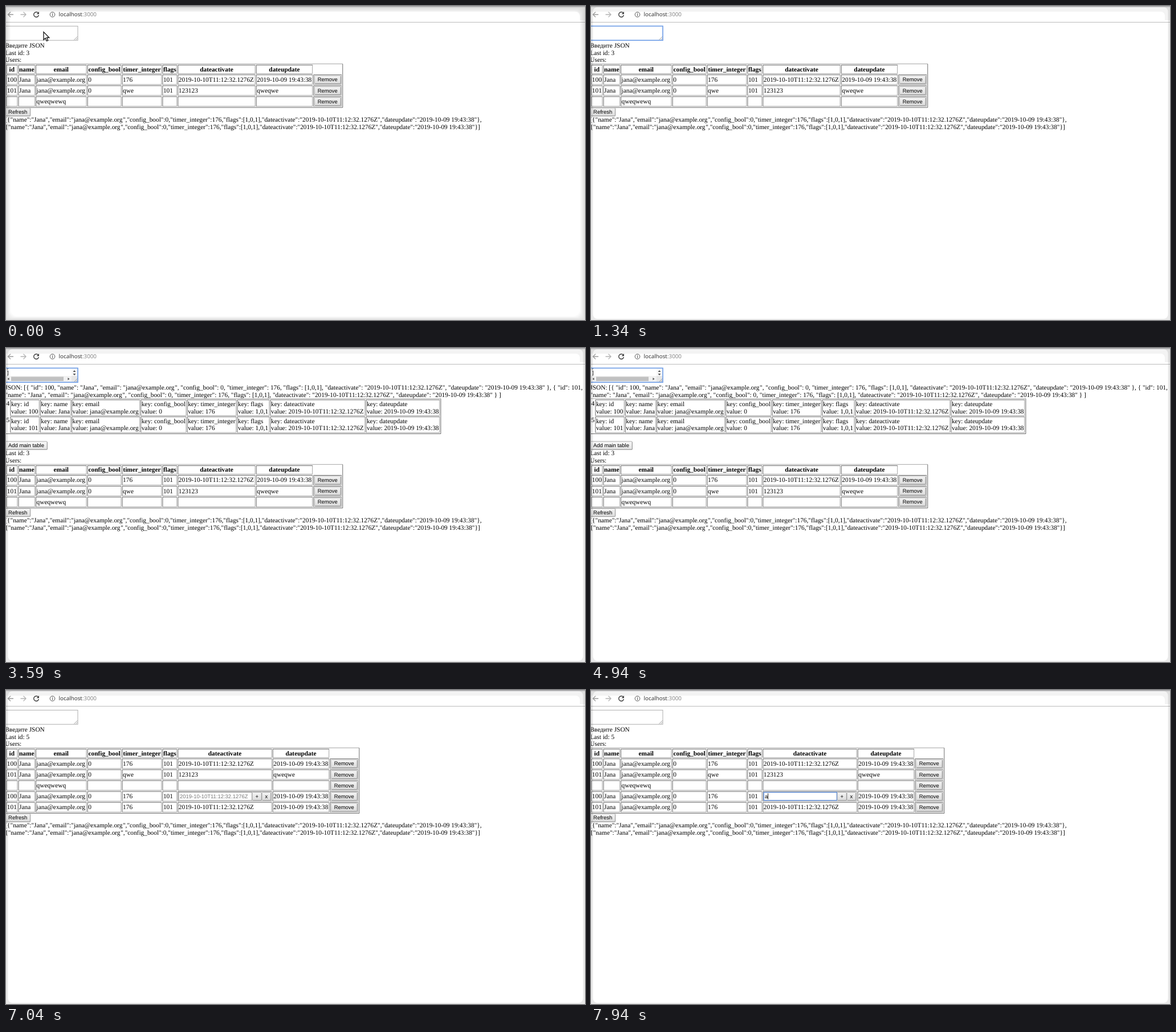
An HTML page that plays this animation: 1016 by 551 pixels, repeating every 8000 ms.

```html
<!DOCTYPE html>
<html lang="en">
<head>
<meta charset="utf-8">
<title>JSON user table</title>
<style>
html, body { margin: 0; width: 100%; height: 100%; overflow: hidden; background: #fff; }
svg { display: block; width: 100vw; height: 100vh; }
text { font-family: "Liberation Serif", serif; font-size: 16px; text-rendering: geometricPrecision; }
.b { font-weight: bold; text-anchor: middle; }
.ui { font-family: "Liberation Sans", sans-serif; font-size: 13.333px; }
.mid { text-anchor: middle; }
.url { font-family: "Noto Sans", sans-serif; font-size: 9.8px; }
.mono { font-family: "DejaVu Sans Mono", monospace; font-size: 9.44px; }
</style>
</head>
<body>
<svg id="stage" viewBox="0 0 1016 551" preserveAspectRatio="none">
  <defs>
    <linearGradient id="face" x2="0" y2="1"><stop stop-color="#f4f4f4"/><stop offset="1" stop-color="#dcdcdc"/></linearGradient>
    <linearGradient id="hover" x2="0" y2="1"><stop stop-color="#f9f9f9"/><stop offset="1" stop-color="#e4e4e4"/></linearGradient>
    <clipPath id="area"><rect y="36" width="115" height="13"/></clipPath>
  </defs>
  <g id="bar" fill="none" stroke-width="1.3">
    <path d="M0 2H1016V25H1007V17a7 7 0 0 0-7-7H0z" fill="#f3f3f3"/>
    <path d="M0 1H1016" stroke="#c2c2c4" stroke-width="2"/>
    <path d="M0 28.5H1016" stroke="#bcbcbc" stroke-width="1"/>
    <path d="M13 15H3.5M8 10.5L3.5 15L8 19.5" stroke="#9b9b9b"/>
    <path d="M25.500 15H35M30.500 10.500L35 15L30.500 19.500" stroke="#b4b4b4"/>
    <path d="M56.4 12.100A4.400 4.400 0 1 0 57.400 16" stroke="#444" stroke-width="1.500"/>
    <path d="M58 9.800V14.200H53.600z" fill="#444"/>
    <circle cx="81.500" cy="15" r="4.300" stroke="#555" stroke-width="1"/>
    <path d="M81.500 14.300V17.500M81.500 12.300V13.400" stroke="#555" stroke-width="1.100"/>
    <text class="url" x="92.500" y="18.300" fill="#333">localhost<tspan fill="#868686">:3000</tspan></text>
  </g>
  <g id="box"></g>
  <g id="page" transform="translate(-1.7 63) scale(.7083)"></g>
  <g id="glow"></g>
  <path id="mouse" d="M66 45.500V59.300L69.200 56.400L71.400 61.500L73.700 60.500L71.500 55.500H75.800z" fill="#fff" stroke="#111" stroke-width="1.300"/>
</svg>
<script>
const LOOP = 8000;
const NAME = "Jana", MAIL = "jana@example.org";
const STAMP = "2019-10-10T11:12:32.1276Z", UPDATED = "2019-10-09 19:43:38";
const KEYS = ["id", "name", "email", "config_bool", "timer_integer", "flags", "dateactivate", "dateupdate"];
const user = id => [id, NAME, MAIL, "0", "176", "101", STAMP, UPDATED];
const ROWS = [
  user("100"),
  ["101", NAME, MAIL, "0", "qwe", "101", "123123", "qweqwe"],
  ["", "", "qweqwewq", "", "", "", "", ""],
  user("100"),
  user("101")
];
const FIELDS = `"name":"${NAME}","email":"${MAIL}","config_bool":0,"timer_integer":176,"flags":[1,0,1],"dateactivate":"${STAMP}","dateupdate":"${UPDATED}"`;
const SPACED = FIELDS.replace(/":/g, '": ').replace(/,"/g, ', "');
const DARK = "#2c2c2c", GRAY = "#808080";
const $ = id => document.getElementById(id);

function text(x, y, s, cls = "", fill = "#000") {
  const body = String(s).replace(MAIL + '"', MAIL + '<tspan dx=".9">"</tspan>');
  return `<text x="${x}" y="${y}" class="${cls}" fill="${fill}">${body}</text>`;
}

const rect = (x, y, w, h, fill, extra = "") =>
  `<rect x="${x}" y="${y}" width="${w}" height="${h}" fill="${fill}" ${extra}/>`;

const path = (d, stroke, width = 1, fill = "none") =>
  `<path d="${d}" fill="${fill}" stroke="${stroke}" stroke-width="${width}"/>`;

function bevel(x, y, w, h, tl, br) {
  const l = x + .5, t = y + .5, r = x + w - .5, b = y + h - .5;
  return path(`M${l} ${y + h}V${t}H${x + w}`, tl) + path(`M${r} ${y + 1}V${b}H${x + 1}`, br);
}
const cell = (x, y, w, h) => bevel(x, y, w, h, DARK, GRAY);
const frame = (x, y, w, h) => bevel(x, y, w, h, GRAY, DARK);

function button(x, y, w, label, hot) {
  return rect(x + .5, y + .5, w - 1, 20, `url(#${hot ? "hover" : "face"})`, `rx="2" stroke="${hot ? "#8c8c8c" : "#a0a0a0"}"`) +
    path(`M${x + 2} ${y + 20.5}H${x + w - .5}V${y + 2}`, "#8a8a8a") +
    text(x + w / 2, y + 15, label, "ui mid");
}

function columns(widths, x) {
  return widths.map(w => { const c = { x, w }; x += w + 2; return c; });
}

function editor(x, y, s) {
  let out = rect(x + .5, y + .5, 181, 20, "#fff", `stroke="${s.active ? "#5f8fdc" : "#a0a0a0"}" stroke-width="${s.active ? 2 : 1.3}"`);
  out += s.typed ? text(x + 3, y + 15, "a", "ui") : text(x + 3, y + 15, STAMP, "ui", "#757575");
  if (s.active) out += rect(x + (s.typed ? 10.4 : 3), y + 3, 1.2, 15, "#000");
  return out + button(x + 182, y, 24, "+") + button(x + 206, y, 23, "x");
}

function mainTable(top, s) {
  const cols = columns([28, 41, 126, 84, 98, 36, s.edit ? 233 : 192, 140, 70], 3);
  const count = s.done ? 5 : 3, last = cols[8];
  const height = 28 + count * 27;
  let out = frame(0, top, last.x + last.w + 3, height);
  KEYS.forEach((key, i) => {
    const { x, w } = cols[i];
    out += cell(x, top + 3, w, 22) + text(x + w / 2, top + 19, key, "b");
  });
  ROWS.slice(0, count).forEach((row, r) => {
    const y = top + 27 + r * 27;
    row.forEach((value, i) => {
      const { x, w } = cols[i];
      out += cell(x, y, w, 25);
      out += s.edit && r === 3 && i === 6 ? editor(x + 2, y + 2, s) : text(x + 2, y + 17.5, value);
    });
    out += cell(last.x, y, last.w, 25) + button(last.x + 2, y + 2, 66, "Remove");
  });
  const end = top + height;
  return out + button(0, end, 63, "Refresh") +
    text(0, end + 35, `[{${FIELDS}},`) + text(0, end + 53, `{${FIELDS}}]`);
}

function preview(s) {
  const cols = columns([72, 76, 169, 113, 122, 80, 235, 183], 13);
  let out = text(0, 14, `JSON: [{ "id": 100, ${SPACED} }, { "id": 101,`) + text(0, 32, `${SPACED} } ]`);
  out += frame(0, 36, 1080, 88);
  [100, 101].forEach((id, r) => {
    const y = 39 + r * 42;
    const values = [id, NAME, MAIL, "0", "176", "1,0,1", STAMP, UPDATED];
    out += text(3, y + 14, 4 + r);
    cols.forEach(({ x, w }, i) => {
      out += cell(x, y, w, 40) + text(x + 2, y + 16, "key: " + KEYS[i]) + text(x + 2, y + 34, "value: " + values[i]);
    });
  });
  return out + button(0, 142, 105, "Add main table", s.hot);
}

function pageBody(s) {
  const top = s.loaded ? 163 : 18;
  return (s.loaded ? preview(s) : text(0, 14, "Введите JSON")) +
    text(0, top + 14, "Last id: " + (s.done ? 5 : 3)) +
    text(0, top + 32, "Users:") + mainTable(top + 36, s);
}

function textBox(s) {
  let out = rect(-1.3, 35.3, 127.3, 24.9, "#fff");
  if (s.loaded) {
    out += `<g clip-path="url(#area)">${text(.4, 35.9, "}", "mono")}${text(.4, 46.5, "]", "mono")}</g>`;
    out += rect(0, 49, 115, 10.5, "#f1f1f1") + rect(9, 50.5, 92, 7.5, "#c1c1c1");
    out += `<path d="M5.500 52V56.500L2.500 54.250zM108.500 52V56.500L111.500 54.250z" fill="#505050"/>`;
    out += rect(115, 36, 10.5, 13, "#f8f8f8") + rect(115, 49, 10.5, 10.5, "#e6e6e6");
    out += `<path d="M117.500 42H122.500L120 39zM117.500 45H122.500L120 48z" fill="#505050"/>`;
  }
  out += path("M119.500 59.500L125.500 53.500M122.500 59.500L125.500 56.500", "#8a8a8a", .8);
  out += rect(-1.3, 35.3, 127.3, 24.9, "none", s.focus ? 'stroke="#6c9ce6" stroke-width="1.6"' : 'stroke="#a5a5a5" stroke-width=".9"');
  if (s.caret) out += rect(s.loaded ? 6 : 0, 38, 1, 11, "#111");
  return out;
}

// Shaded rim around a rounded window
function rim(l, t, r, b, rad, alpha) {
  const w = 1016 - l - r - 2 * rad, h = 551 - t - b - 2 * rad;
  const arc = (x, y) => `a${rad} ${rad} 0 0 1 ${x} ${y}`;
  return `<path fill-rule="evenodd" fill-opacity="${alpha}" d="M0 0H1016V551H0zM${l + rad} ${t}h${w}${arc(rad, rad)}v${h}${arc(-rad, rad)}h${-w}${arc(-rad, -rad)}v${-h}${arc(rad, -rad)}z"/>`;
}

function glow(s) {
  if (!s.start) return rim(3.5, 2, 3.5, 2, 8, .085);
  let out = "";
  for (let i = 1; i <= 8; i++) out += rim(i, i + 1, i + 1, i * .8, 4 + i, .016);
  return out;
}

function stateAt(t) {
  const within = (a, b) => t >= a && t < b;
  return {
    start: t < 450,
    focus: within(450, 5090),
    loaded: within(1490, 5090),
    hot: within(3590, 5090),
    caret: within(450, 1340) || within(1490, 2540) || within(4040, 4940),
    done: t >= 5090,
    edit: t >= 7040,
    active: t >= 7640,
    typed: t >= 7940
  };
}

let shown = "";
function render(t) {
  const s = stateAt(t), key = JSON.stringify(s);
  if (key === shown) return;
  shown = key;
  $("box").innerHTML = textBox(s);
  $("page").innerHTML = pageBody(s);
  $("glow").innerHTML = glow(s);
  $("mouse").style.display = s.start ? "" : "none";
}

let begin;
function tick(now) {
  begin ??= now;
  render((now - begin) % LOOP);
  requestAnimationFrame(tick);
}
render(0);
requestAnimationFrame(tick);
</script>
</body>
</html>
```
